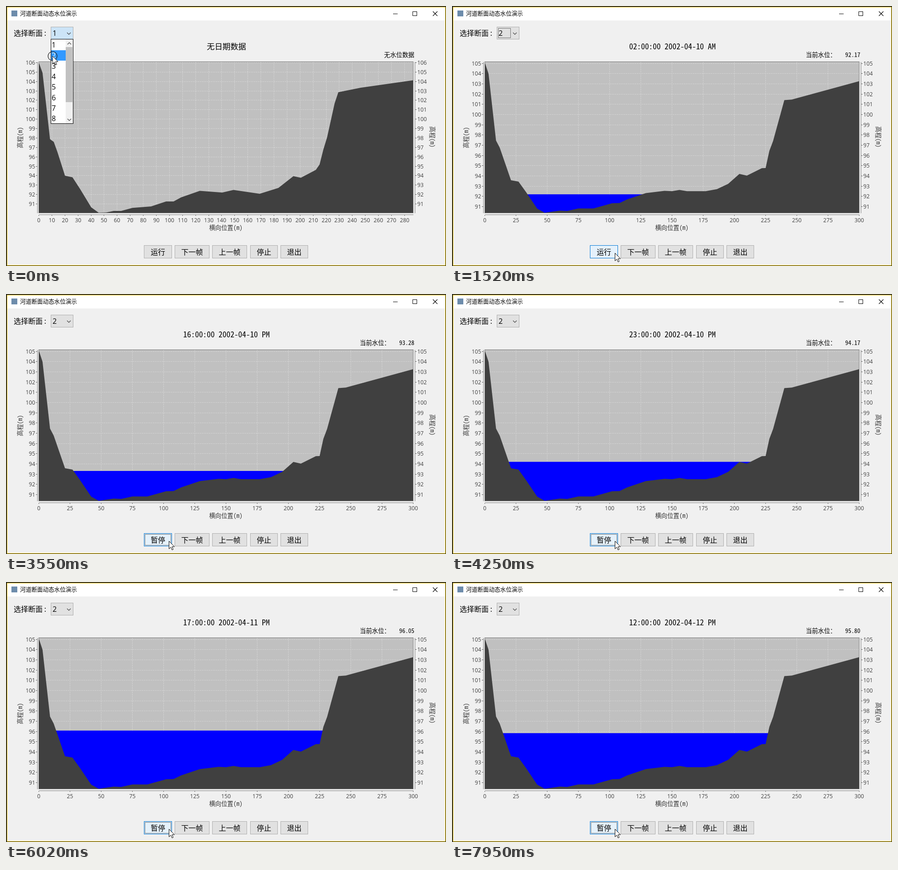
An HTML page with a canvas for the animation above (8 s loop, 973 by 576 pixels).

```html
<!DOCTYPE html>
<html lang="zh-CN">
<head>
<meta charset="utf-8">
<title>河道断面动态水位演示</title>
<style>
html, body { margin: 0; width: 100%; height: 100%; overflow: hidden; background: #f0f0f0; }
canvas { display: block; width: 973px; height: 576px; }
</style>
</head>
<body>
<canvas id="stage" width="973" height="576"></canvas>
<script>
const ctx = document.getElementById('stage').getContext('2d');
const LOOP = 8000;
const SANS = '"Noto Sans CJK SC", "Noto Sans CJK", sans-serif';
const MONO = '"Noto Sans Mono CJK SC", "Noto Sans CJK SC", "Noto Sans Mono", monospace';
const DIGITS = '"Open Sans", "Noto Sans", sans-serif';
const PLOT = { x: 73, y: 124, w: 828, h: 335 };
const FLOOR = PLOT.y + PLOT.h;

// Corner points of each river bed: [percent of the width, height on the stage]
const sections = [
  {
    top: 106, topY: 125.5, perM: 20.87, xStep: 10, xMax: 280, perX: 2.889,
    bed: [[0, 125], [1, 148], [3, 295], [4, 301], [5, 324], [7, 376], [9, 379.5], [11, 405],
      [14, 446], [16, 458], [18, 457.5], [20, 454], [22, 454], [25, 447.3], [30, 444], [34, 433],
      [36, 433], [38, 424], [43, 409.5], [49, 413.3], [52, 407.5], [59, 416], [64, 403], [68, 377],
      [70, 380.5], [74, 363], [75, 351], [76, 318], [77, 291], [79, 216], [80, 191], [86, 181], [100, 164.5]]
  },
  {
    top: 105, topY: 127, perM: 22.68, xStep: 25, xMax: 300, perX: 2.76,
    bed: [[0, 125], [1, 150], [3, 298], [4, 314], [7, 386], [9, 389], [11, 412], [14, 449],
      [16, 458], [20, 453.3], [22, 454], [25, 448.5], [29, 448.5], [34, 437], [36, 436.5], [38, 428.5],
      [43, 414.5], [48, 409.5], [50, 410.3], [52, 407.5], [54, 410.3], [59, 410.3], [62, 405.7], [65, 394],
      [68, 372], [70, 375.7], [74, 359.3], [75, 359], [76, 321], [77, 299], [80, 208.5], [82, 207.3], [100, 166.5]]
  }
];

// [ms, hours since midnight of the first day]
const clock = [[2000, 2], [2800, 9], [4780, 29], [7950, 60]];
// [hour, water level]
const levels = [[2, 92.17], [9, 92.47], [16, 93.28], [24, 94.3], [29, 95.23],
  [33, 95.7], [41, 96.05], [46, 96.1], [60, 95.8]];

function lerpKeys(keys, v) {
  if (v <= keys[0][0]) return keys[0][1];
  for (let i = 1; i < keys.length; i++) {
    const [a, p] = keys[i - 1], [b, q] = keys[i];
    if (v <= b) return p + (q - p) * (v - a) / (b - a);
  }
  return keys[keys.length - 1][1];
}

function box(x, y, w, h, fill, stroke) {
  ctx.fillStyle = fill;
  ctx.fillRect(x, y, w, h);
  if (stroke) {
    ctx.strokeStyle = stroke;
    ctx.lineWidth = 1;
    ctx.strokeRect(x + .5, y + .5, w - 1, h - 1);
  }
}

function line(points, color, width = 1, dash = []) {
  ctx.beginPath();
  points.forEach(([x, y]) => ctx.lineTo(x, y));
  ctx.strokeStyle = color;
  ctx.lineWidth = width;
  ctx.setLineDash(dash);
  ctx.stroke();
  ctx.setLineDash([]);
}

function text(str, x, baseline, font, align = 'left', color = '#000') {
  ctx.font = font;
  ctx.textAlign = align;
  ctx.fillStyle = color;
  ctx.fillText(str, x, baseline);
}

function focusRing(x, y, w, h) {
  ctx.strokeStyle = '#000';
  ctx.lineWidth = 1;
  ctx.setLineDash([1, 1]);
  ctx.strokeRect(x + .5, y + .5, w, h);
  ctx.setLineDash([]);
}

function chevron(x, y, dir = 1) {
  line([[x - 4, y - 2 * dir], [x, y + 2 * dir], [x + 4, y - 2 * dir]], '#444', 1.2);
}

function drawWindow() {
  box(0, 0, 973, 576, '#2b2b2b');
  box(2, 2, 970, 573, '#f0f0f0', '#ffd81a');
  box(3, 3, 968, 29, '#fff');
  box(12, 10, 13, 13, '#6d8cab');
  text('河道断面动态水位演示', 31, 21, '12.6px ' + SANS);
  line([[856, 17.5], [866, 17.5]], '#000');
  ctx.strokeRect(899.5, 12.5, 9, 9);
  line([[944, 12], [954, 22]], '#000', 1.1);
  line([[954, 12], [944, 22]], '#000', 1.1);
  text('选择断面 :', 17, 66, '16px ' + SANS);
}

function drawCombo(t) {
  const lit = t < 340;
  box(99, 46, 50, 28, lit ? '#cce4f7' : '#e1e1e1', '#adadad');
  text(t < 130 ? '1' : '2', 103, 66, '16px ' + DIGITS);
  chevron(139, 61);
  if (!lit && t < 1950) focusRing(102, 49, 27, 21);
}

function drawPopup() {
  box(99, 73, 50, 188, '#fff', '#000');
  box(100, 98, 32, 23, '#3399ff');
  for (let i = 0; i < 8; i++) {
    text(i + 1, 101, 92 + i * 23.3, '16px ' + DIGITS, 'left', i === 1 ? '#fff' : '#000');
  }
  box(132, 74, 16, 186, '#f0f0f0');
  box(132, 91, 15, 122, '#c1c1c1');
  chevron(140, 83, -1);
  chevron(140, 252);
}

function drawBed(bed) {
  const left = PLOT.x - .5;
  ctx.beginPath();
  ctx.moveTo(left, FLOOR);
  bed.forEach(([x, y]) => ctx.lineTo(left + PLOT.w * x / 100, y));
  ctx.lineTo(left + PLOT.w, FLOOR);
  ctx.fillStyle = '#404040';
  ctx.fill();
}

function sideTitle(x, y, turn) {
  ctx.save();
  ctx.translate(x, y);
  ctx.rotate(turn * Math.PI / 2);
  text('高程(m)', 0, 5, '13.4px ' + MONO, 'center', '#333');
  ctx.restore();
}

function drawChart(s, level) {
  const right = PLOT.x + PLOT.w;
  const yOf = v => s.topY + (s.top - v) * s.perM;
  const snap = v => Math.floor(v) + .5;
  const font = '12.2px ' + DIGITS;

  box(PLOT.x, PLOT.y, PLOT.w, PLOT.h, '#c0c0c0');
  line([[69.5, PLOT.y], [69.5, FLOOR]], '#808080');
  line([[904.5, PLOT.y], [904.5, FLOOR]], '#808080');
  line([[PLOT.x, 462.5], [right, 462.5]], '#808080');

  for (let v = 91; v <= s.top; v++) {
    const y = snap(yOf(v));
    line([[PLOT.x, y], [right, y]], '#dadada', 1, [2, 2]);
    line([[66, y], [69, y]], '#666');
    line([[905, y], [908, y]], '#666');
    text(v, 64.5, y + 4.5, font, 'right', '#404040');
    text(v, 909.5, y + 4.5, font, 'left', '#404040');
  }
  for (let v = 0; v <= s.xMax; v += s.xStep) {
    const x = snap(PLOT.x - .5 + v * s.perX);
    line([[x, PLOT.y], [x, FLOOR]], '#dadada', 1, [2, 2]);
    line([[x, 463], [x, 465]], '#666');
    text(v, x, 479, font, 'center', '#404040');
  }

  if (level) {
    const y = yOf(level) - .8;
    box(PLOT.x, y, PLOT.w, FLOOR - y, '#00f');
  }
  drawBed(s.bed);
  ctx.strokeStyle = '#777';
  ctx.lineWidth = 1;
  ctx.strokeRect(PLOT.x - .5, PLOT.y - .5, PLOT.w, PLOT.h);

  text('横向位置(m)', 486, 496, '13.4px ' + MONO, 'center', '#333');
  sideTitle(31, 291.5, -1);
  sideTitle(943, 290, 1);
}

function drawHeader(hour, level) {
  const two = n => String(n).padStart(2, '0');
  const h = hour % 24;
  const title = level
    ? `${two(h)}:00:00 2002-04-${10 + Math.floor(hour / 24)} ${h < 12 ? 'AM' : 'PM'}`
    : '无日期数据';
  const note = level ? `当前水位：   ${level.toFixed(2)}` : '无水位数据';
  text(title, 487.5, 96, '17.4px ' + MONO, 'center');
  text(note, 903, 113, '13.4px ' + MONO, 'right');
}

function pointer(t) {
  if (t < 530) return [103, 111];
  if (t >= 1520) return [360.5, 547.5];
  if (t >= 1460) return [362, 548];
  const step = Math.min(10, Math.floor((t - 530) / 60));
  const u = (step + 1) / 11;
  const e = u * u * (3 - 2 * u);
  const bend = (a, b, c) => (1 - e) * (1 - e) * a + 2 * e * (1 - e) * b + e * e * c;
  return [bend(103, 405, 364), bend(111, 360, 549)];
}

function drawButtons(t, [px, py]) {
  const pressed = t >= 1950 && t < 2060;
  const hover = px >= 306 && px <= 366 && py >= 531 && py <= 558;
  const labels = [[305, 62, t < 2060 ? '运行' : '暂停'], [373, 77, '下一帧'], [456, 77, '上一帧'],
    [540, 61, '停止'], [607, 61, '退出']];
  labels.forEach(([x, w, label], i) => {
    const hot = i === 0 && hover;
    const fill = hot ? (pressed ? '#cce4f7' : '#e5f1fb') : '#e1e1e1';
    const edge = hot ? (pressed ? '#005499' : '#0078d7') : '#adadad';
    box(x, 530, w, 29, fill, edge);
    text(label, x + w / 2, 550.5, '16px ' + SANS, 'center');
  });
  if (t >= 1950) focusRing(307, 532, 57, 24);
}

function drawPointer([x, y], click) {
  if (click) {
    ctx.beginPath();
    ctx.arc(x, y, 10, 0, Math.PI * 2);
    ctx.strokeStyle = '#222';
    ctx.lineWidth = 1.2;
    ctx.stroke();
  }
  const shape = [[0, 0], [0, 17], [4, 13.3], [6.7, 19.5], [9.3, 18.4], [6.7, 12.3], [12, 12.3]];
  ctx.beginPath();
  shape.forEach(([dx, dy]) => ctx.lineTo(x + dx, y + dy));
  ctx.closePath();
  ctx.fillStyle = '#fff';
  ctx.fill();
  ctx.strokeStyle = '#000';
  ctx.lineWidth = 1;
  ctx.stroke();
}

function draw(t) {
  const first = t < 130;
  const hour = Math.floor(lerpKeys(clock, t) + 1e-6);
  const level = first ? 0 : lerpKeys(levels, hour);
  const at = pointer(t);
  drawWindow();
  drawHeader(hour, level);
  drawChart(sections[first ? 0 : 1], level);
  drawCombo(t);
  if (first) drawPopup();
  drawButtons(t, at);
  drawPointer(at, t < 180 || (t >= 1950 && t < 2120));
}

const start = performance.now();
function frame() {
  draw((performance.now() - start) % LOOP);
  requestAnimationFrame(frame);
}
draw(0);
requestAnimationFrame(frame);
</script>
</body>
</html>
```
